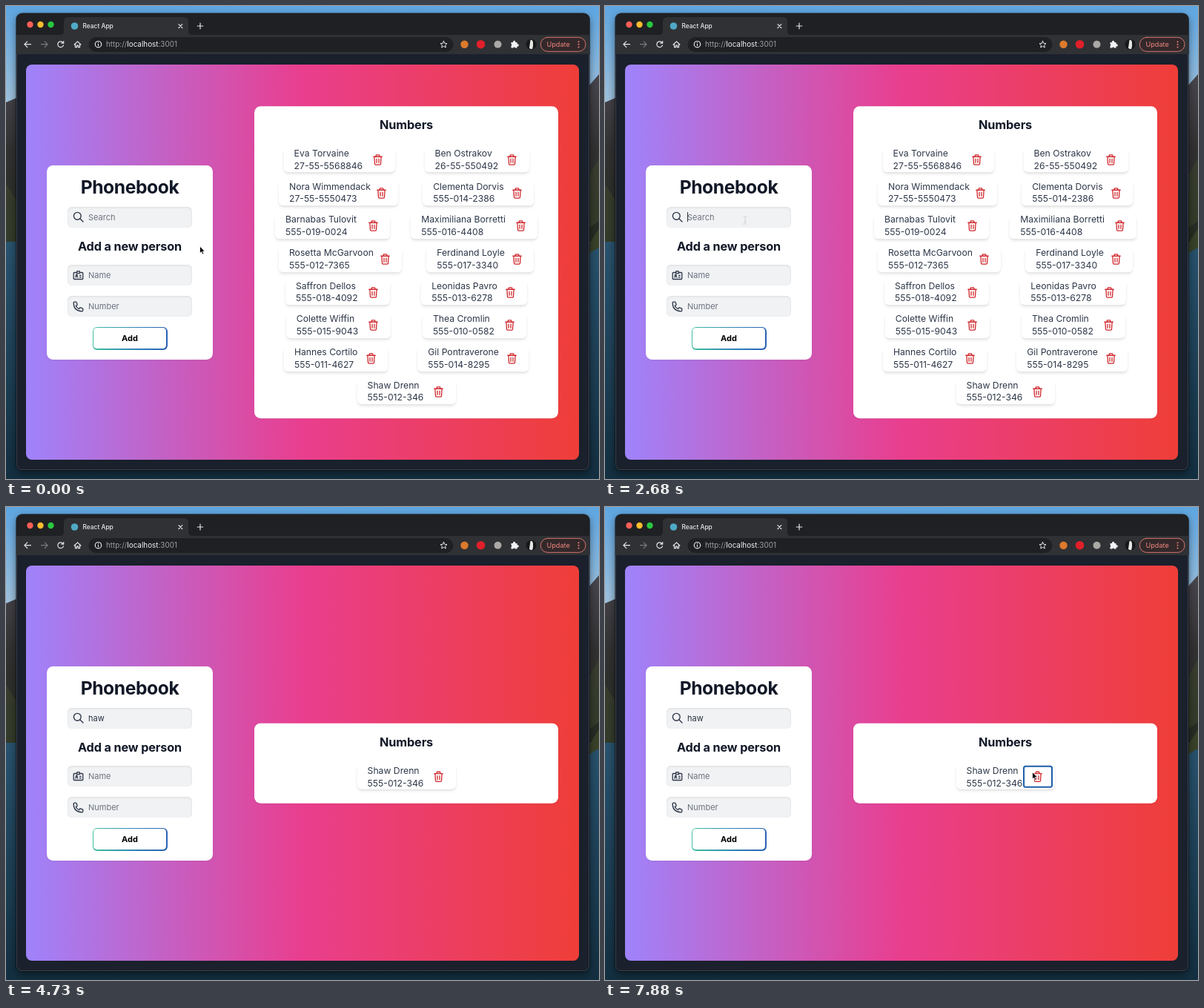
Recreate the animation shown at these times as an HTML page. Size 800 by 638 pixels, loop 8000 ms.

```html
<!DOCTYPE html>
<html lang="en">
<head>
<meta charset="utf-8">
<title>Phonebook</title>
<style>
html, body { margin: 0; width: 100%; height: 100%; overflow: hidden; background: #14303f; }
body { position: relative; font-family: Inter, "Open Sans", sans-serif; color: #2d3748; }
svg { display: block; overflow: visible; }
#desk { position: absolute; left: 0; top: 0; }
#window { position: absolute; left: 13.5px; top: 10px; width: 773.5px; height: 616px; border-radius: 8px;
  background: #1a202c; box-shadow: 0 0 0 .7px rgba(0,0,0,.6), inset 0 0 0 .7px rgba(255,255,255,.2), 0 4px 12px rgba(0,0,0,.5); }
#page { position: absolute; left: 27px; top: 79px; width: 746px; height: 533px; border-radius: 8px;
  background: linear-gradient(90deg, #9f83fb, #e93e8e 50%, #ef3e38); }
.panel { position: absolute; background: #fff; border-radius: 8.4px; box-shadow: 0 1px 3px rgba(0,0,0,.06); }
h1, h2 { position: absolute; left: 0; right: 0; margin: 0; text-align: center; color: #111827; white-space: nowrap; }
h1 { top: 13px; font: 700 24.7px/32px Inter, sans-serif; letter-spacing: -.018em; }
h2 { font: 700 16.3px/22px Inter, sans-serif; letter-spacing: -.01em; }
#form { left: 55px; top: 214.5px; width: 224px; height: 262.5px; }
.field { position: absolute; left: 28px; width: 140px; height: 28px; padding-left: 28px; border-radius: 5.6px;
  background: #f1f2f4; box-shadow: inset 0 1px 3px rgba(0,0,0,.09); font-size: 11px; line-height: 28px;
  color: #6b7280; white-space: pre; }
.field svg { position: absolute; left: 6.5px; top: 6.5px; }
.typed { color: #283342; }
#caret { display: inline-block; width: 1px; height: 13px; margin-right: -1px; background: #333; vertical-align: -2.5px; }
#add { position: absolute; left: 61.5px; top: 218px; width: 101px; height: 31px; box-sizing: border-box; padding: 1.6px;
  border-radius: 6px; background: linear-gradient(90deg, #3fc0a0, #2f7fb8 60%, #2b62b5); }
#add b { display: block; height: 100%; border-radius: 4.6px; background: #fff; color: #000;
  font: 700 11px/28px Inter, sans-serif; text-align: center; }
#numbers { left: 334.7px; width: 410.8px; top: 345.8px; padding: 55.7px 0 19px; transform: translateY(-50%); }
#numbers h2 { top: 14.5px; }
#list { display: flex; flex-wrap: wrap; justify-content: space-evenly; row-gap: 10.7px; }
.card { position: relative; height: 34px; box-sizing: border-box; padding: .5px 0 0 14px; border-radius: 6px;
  font-size: 12.2px; line-height: 16.6px; white-space: nowrap;
  box-shadow: 0 2.8px 4.2px -.7px rgba(0,0,0,.1), 0 1.4px 2.8px -.7px rgba(0,0,0,.07); }
.del { position: absolute; right: 2.5px; top: 2px; width: 40.5px; height: 30px; box-sizing: border-box;
  border: 2px solid transparent; border-radius: 3.5px; }
.del svg { position: absolute; left: 10.7px; top: 4.5px; }
.del.focus { border-color: #1c5fab; background: #fff; }
#cursor { position: absolute; left: 0; top: 0; }
</style>
</head>
<body>
<svg id="desk" width="800" height="638">
  <defs>
    <linearGradient id="sky" x2="0" y2="1"><stop stop-color="#5ea6e2"/><stop offset="1" stop-color="#a5c4dc"/></linearGradient>
    <linearGradient id="hill" x2="0" y2="1"><stop stop-color="#4a4850"/><stop offset=".4" stop-color="#333233"/><stop offset="1" stop-color="#232c20"/></linearGradient>
    <linearGradient id="sea" x2="0" y2="1"><stop stop-color="#29536f"/><stop offset="1" stop-color="#132f40"/></linearGradient>
  </defs>
  <rect width="800" height="140" fill="url(#sky)"/>
  <path d="M0 130L14 124V340H0Z M786 108L800 92V340H786Z" fill="url(#hill)"/>
  <path d="M0 240L14 262V320H0Z M800 205L786 230V300L800 290Z" fill="#424a30" opacity=".5"/>
  <path d="M0 318H800V638H0Z" fill="url(#sea)"/>
  <path d="M800 300L786 322V334L800 326Z" fill="#394329"/>
</svg>

<div id="window">
<svg width="773.5" height="616" viewBox="13.5 10 773.5 616" fill="none" stroke-linecap="round" stroke-linejoin="round">
  <path d="M13.5 65V18a8 8 0 0 1 8-8H779a8 8 0 0 1 8 8V65Z" fill="#1f2023"/>
  <path d="M13.5 39H72q5.5 0 5.5-5.5V21q0-6 6-6H239.5q6 0 6 6V33.5q0 5.5 5.5 5.5H787V65H13.5Z" fill="#303134"/>
  <circle cx="32" cy="25" r="4.2" fill="#fe5f57"/>
  <circle cx="46" cy="25" r="4.2" fill="#febc2e"/>
  <circle cx="60" cy="25" r="4.2" fill="#28c840"/>
  <circle cx="92" cy="27" r="4.8" fill="#4fa9c6"/>
  <rect x="111" y="42" width="492" height="20" rx="10" fill="#1f2023"/>
  <g stroke="#e3e5e8" stroke-width="1.2">
    <path d="M232.5 24.7l4.8 4.8m0-4.8l-4.8 4.8M257.7 27h7.6M261.5 23.2v7.6"/>
    <path d="M33 51.7H24.5M28.3 47.8l-3.9 3.9 3.9 3.9"/>
    <path d="M47 51.7H55.5M51.7 47.8l3.9 3.9-3.9 3.9" stroke="#777a7f"/>
    <path d="M76.5 49.5A3.9 3.9 0 1 0 77 52.8M77.2 47.5V50.2H74.4"/>
    <path d="M91.6 52L96 47.9l4.4 4.1M93 51.5V55.7H95V53.2H97V55.7H99V51.5"/>
    <circle cx="124" cy="51.7" r="4.2"/><path d="M124 51.4v2.2M124 49.4v.1"/>
    <path d="M590 47.3l1.3 3 3.2.3-2.4 2.2.7 3.2-2.8-1.7-2.8 1.7.7-3.2-2.4-2.2 3.2-.3Z" stroke-width="1"/>
  </g>
  <circle cx="618" cy="51.7" r="5.2" fill="#dd7a2c"/>
  <circle cx="640" cy="51.7" r="5.8" fill="#e0202a"/>
  <circle cx="663" cy="51.7" r="5" fill="#aaa9a6"/>
  <path d="M681 49h2.5a1.7 1.7 0 1 1 3.2 0H689v2.3a1.7 1.7 0 1 1 0 3.2V56.5H686.5a1.5 1.5 0 0 0-2.8 0H681V53.8a1.5 1.5 0 0 0 0-2.6Z" fill="#f1f3f4"/>
  <circle cx="708" cy="51.7" r="7" fill="#17181a"/>
  <path d="M707 46q3-1 3.5 3.5t-.8 8.2q-3.5.8-4.2-1.2Z" fill="#e6e6e4"/>
  <rect x="720.8" y="42.3" width="60.7" height="19" rx="9.5" stroke="#d8766f" fill="#32282a"/>
  <g fill="#f0857d"><circle cx="772" cy="48.2" r="1"/><circle cx="772" cy="51.8" r="1"/><circle cx="772" cy="55.4" r="1"/></g>
  <g font-family="Inter, sans-serif" fill="#e8eaed">
    <text x="103" y="30.2" font-size="8.4" font-weight="500">React App</text>
    <text x="134.5" y="55.2" font-size="9.9" fill="#9aa0a6">http://<tspan fill="#f1f3f4">localhost</tspan>:3001</text>
    <text x="729" y="55" font-size="9.1" fill="#f0857d">Update</text>
  </g>
</svg>
</div>
<div id="page"></div>

<div class="panel" id="form">
  <h1>Phonebook</h1>
  <div class="field" style="top:56px"><svg width="15" height="15" fill="none" stroke="#2d3748" stroke-width="1.4" stroke-linecap="round"><circle cx="6.3" cy="6.3" r="4.9"/><path d="M10 10l4 4"/></svg><span id="query"></span><span id="caret"></span><span id="hint">Search</span></div>
  <h2 style="top:98.5px">Add a new person</h2>
  <div class="field" style="top:134.5px"><svg width="15" height="15" fill="none" stroke="#2d3748" stroke-width="1.3" stroke-linejoin="round"><path d="M5.5 3.5H2.2q-1 0-1 1v7q0 1 1 1H12.8q1 0 1-1v-7q0-1-1-1H9.5M5.8 1.7h3.4v3H5.8ZM3.5 10.3q.2-1.5 1.8-1.5t1.8 1.5M9 7.3h2.7M9 9.7h2.7"/><circle cx="5.3" cy="7.2" r="1"/></svg>Name</div>
  <div class="field" style="top:176.5px"><svg width="15" height="15" fill="none" stroke="#2d3748" stroke-width="1.3" stroke-linejoin="round"><path d="M1.2 2.5q0-1.3 1.3-1.3H4.3q.6 0 .8.6l1 2.7q.2.7-.4 1.1L4.3 6.4q1.3 2.9 4.3 4.3l.9-1.5q.4-.6 1-.4l2.8 1q.5.2.5.8V12.5q0 1.3-1.3 1.3Q1.2 13.3 1.2 2.5Z"/></svg>Number</div>
  <div id="add"><b>Add</b></div>
</div>

<div class="panel" id="numbers"><h2>Numbers</h2><div id="list"></div></div>

<svg id="cursor" width="1" height="1">
  <path id="arrow" d="M0 0V9.6L2.2 7.6 3.7 11 5.4 10.3 3.9 7H6.8Z" fill="#000" stroke="#fff" stroke-width=".8" stroke-linejoin="round"/>
  <g id="beam" fill="none" stroke-linecap="round">
    <path d="M-2.5-5.3Q0-5.3 0-4V4Q0 5.3-2.5 5.3M2.5-5.3Q0-5.3 0-4M0 4Q0 5.3 2.5 5.3M-1.3 1.5H1.3" stroke="#fff" stroke-width="2.2"/>
    <path d="M-2.5-5.3Q0-5.3 0-4V4Q0 5.3-2.5 5.3M2.5-5.3Q0-5.3 0-4M0 4Q0 5.3 2.5 5.3M-1.3 1.5H1.3" stroke="#111" stroke-width="1"/>
  </g>
</svg>

<script>
const LOOP = 8000;
const $ = id => document.getElementById(id);

// name, number, card width
const people = [
  ["Eva Torvaine", "27-55-5568846", 150], ["Ben Ostrakov", "26-55-550492", 141],
  ["Nora Wimmendack", "27-55-5550473", 161], ["Clementa Dorvis", "555-014-2386", 150],
  ["Barnabas Tulovit", "555-019-0024", 155], ["Maximiliana Borretti", "555-016-4408", 171],
  ["Rosetta McGarvoon", "555-012-7365", 166], ["Ferdinand Loyle", "555-017-3340", 145],
  ["Saffron Dellos", "555-018-4092", 141], ["Leonidas Pavro", "555-013-6278", 143],
  ["Colette Wiffin", "555-015-9043", 141], ["Thea Cromlin", "555-010-0582", 140.5],
  ["Hannes Cortilo", "555-011-4627", 140], ["Gil Pontraverone", "555-014-8295", 150],
  ["Shaw Drenn", "555-012-346", 133]
];
const trash = `<svg width="15" height="17" fill="none" stroke="#d0282d" stroke-width="1.3" stroke-linecap="round" stroke-linejoin="round">
  <path d="M1.8 4H13.2M5.2 3.8V2.4q0-.8.8-.8H9q.8 0 .8.8V3.8M2.9 4.2L3.5 13.6q.1 1.2 1.2 1.2H10.3q1.1 0 1.2-1.2L12.1 4.2M6 7v5M9 7v5"/></svg>`;

const cards = people.map(([name, number, width]) => {
  const el = document.createElement("div");
  el.className = "card";
  el.style.width = width + "px";
  el.innerHTML = `${name}<br>${number}<div class="del">${trash}</div>`;
  $("list").append(el);
  return { el, key: name.toLowerCase() };
});
const lastButton = cards[cards.length - 1].el.querySelector(".del");

// [time, value] steps
const typing = [[0, ""], [2730, "h"], [3180, "ha"], [4230, "haw"]];
const blink = [[0, 0], [1630, 1], [2130, 0], [2380, 1], [3530, 0], [4000, 1], [4730, 0], [5280, 1], [5730, 0], [6230, 1], [6730, 0]];
const focus = [[0, 0], [7580, 1]];
const fade = [[0, 1], [2580, .6], [2680, .12], [2730, 0], [5730, 1]];
// time, x, y
const path = [[0, 261.5, 324], [30, 261.5, 324], [730, 189, 289], [5730, 189, 289], [5900, 262, 300],
  [6180, 423.5, 323.5], [6530, 520, 344], [6900, 561, 354], [7380, 576.5, 357.5], [LOOP, 576.5, 357.5]];

const step = (rows, t) => rows.filter(r => r[0] <= t).pop()[1];

function place(t) {
  const i = Math.max(1, path.findIndex(p => p[0] > t));
  const [a, b] = [path[i - 1], path[i]];
  let k = (t - a[0]) / (b[0] - a[0]);
  if (t < 730) k = k * k * (3 - 2 * k);
  return [a[1] + (b[1] - a[1]) * k, a[2] + (b[2] - a[2]) * k];
}

const show = (el, on) => { el.style.display = on ? "" : "none"; };

let shown = null;
function search(query) {
  if (query === shown) return;
  shown = query;
  $("query").textContent = query;
  $("query").className = "typed";
  show($("hint"), !query);
  cards.forEach(c => show(c.el, c.key.includes(query)));
}

function draw(t) {
  search(step(typing, t));
  $("caret").style.opacity = step(blink, t);
  lastButton.classList.toggle("focus", !!step(focus, t));

  // the pointer advances every 50 ms
  const moveT = t < 30 ? 0 : 30 + Math.floor((t - 30) / 50) * 50;
  const [x, y] = place(moveT);
  const inField = [270.5, 348.5, 390.5].some(top => x > 83 && x < 251 && y > top && y < top + 28);
  show($("beam"), inField);
  show($("arrow"), !inField);
  $("cursor").style.transform = `translate(${x}px, ${y}px)`;
  $("cursor").style.opacity = step(fade, t);
}

const start = performance.now();
function tick(now) {
  draw(Math.max(0, now - start) % LOOP);
  requestAnimationFrame(tick);
}
draw(0);
requestAnimationFrame(tick);
</script>
</body>
</html>
```
